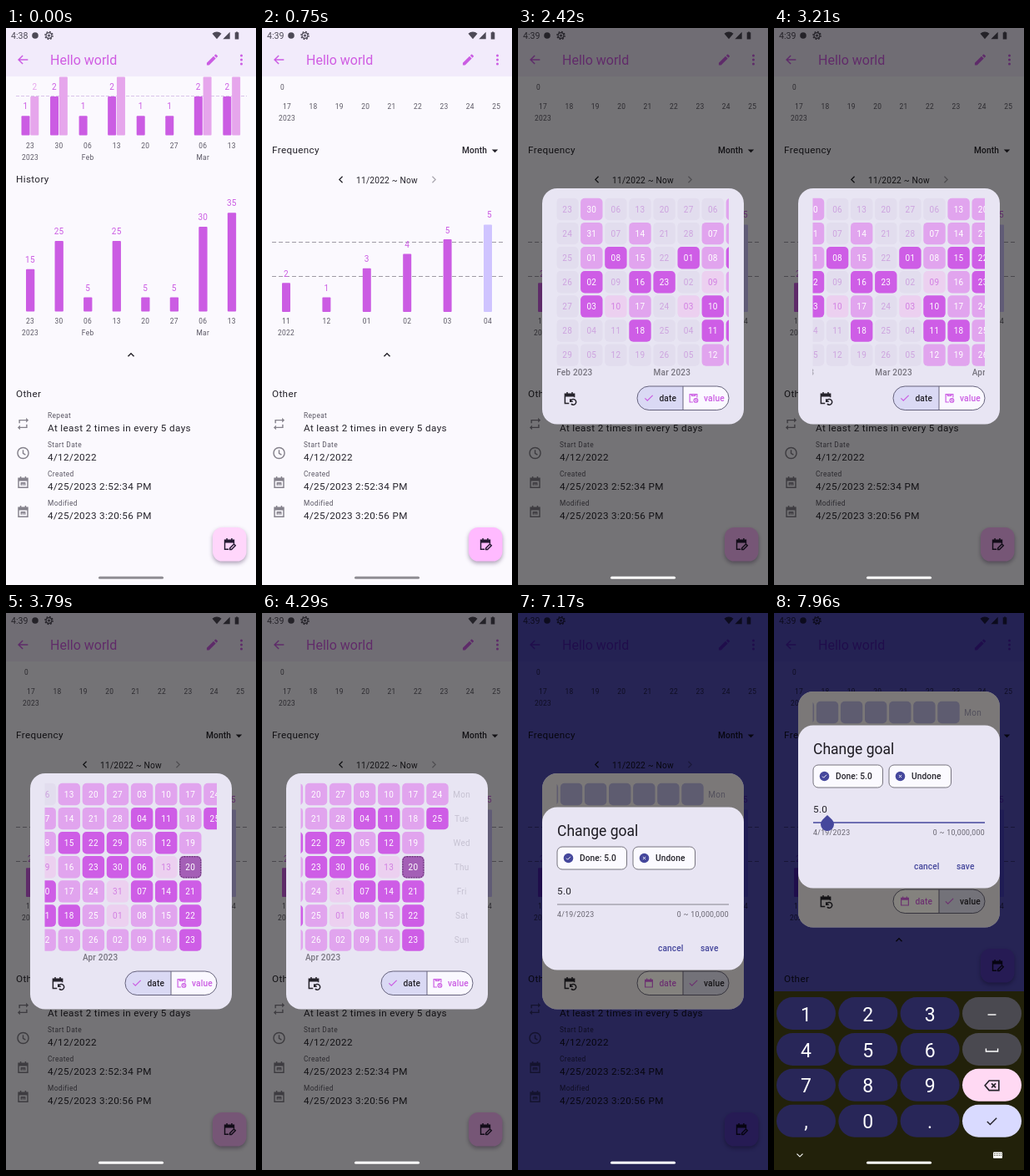
These frames come from a looping animation (300x667 px, 8000 ms). An HTML page with a canvas:

```html
<!DOCTYPE html>
<html lang="en">
<head>
<meta charset="utf-8">
<title>Habit tracker</title>
<style>
  html, body { margin: 0; width: 100%; height: 100%; overflow: hidden; background: #fbf9fe; }
  canvas { display: block; width: 300px; height: 667px; }
</style>
</head>
<body>
<canvas id="stage"></canvas>
<script>
const LOOP = 8000;
const CUT = 620, CALENDAR_IN = 960, VALUE_MODE = 4950, GOAL_IN = 6750, FOCUS = 7440;
const SCROLL = [[1230, 0], [1670, 141], [1840, 198], [2050, 228], [2600, 228], [3210, 187],
  [3600, 72], [3950, 15], [4290, 1], [4450, 0]];

const C = {
  accent: '#cb5ce3', soft: '#e6a6ec', ink: '#25232b', grey: '#5b5864', icon: '#85828c',
  page: '#fbf9fe', bar: '#f2ebfb', dialog: '#e8e5f3', navy: '#45479c'
};

const canvas = document.getElementById('stage');
const ctx = canvas.getContext('2d');
const ratio = window.devicePixelRatio || 1;
canvas.width = 300 * ratio;
canvas.height = 667 * ratio;

const clamp = v => Math.max(0, Math.min(1, v));
const fade = (t, start, length = 150) => clamp((t - start) / length);
const easeOut = v => 1 - (1 - v) ** 3;
const lerp = (a, b, v) => a + (b - a) * v;
const mix = (a, b, v) => `rgb(${a.map((n, i) => Math.round(lerp(n, b[i], v)))})`;

function track(keys, t) {
  if (t <= keys[0][0]) return keys[0][1];
  for (let i = 1; i < keys.length; i++) {
    const [t0, a] = keys[i - 1], [t1, b] = keys[i];
    if (t < t1) return lerp(a, b, (t - t0) / (t1 - t0));
  }
  return keys[keys.length - 1][1];
}

function rect(x, y, w, h, fill, r = 0, stroke) {
  ctx.beginPath();
  ctx.roundRect(x, y, w, h, r);
  if (fill) { ctx.fillStyle = fill; ctx.fill(); }
  if (stroke) { ctx.strokeStyle = stroke; ctx.lineWidth = 1; ctx.stroke(); }
}

// y is the middle of the capitals
function text(s, x, y, size, color, { align = 'left', weight = 400, gap = 0.3 } = {}) {
  ctx.font = `${weight} ${size}px Roboto, sans-serif`;
  ctx.letterSpacing = gap + 'px';
  ctx.textAlign = align;
  ctx.fillStyle = color;
  ctx.fillText(s, x, y + size * 0.355);
}
const centered = (s, x, y, size, color, o) => text(s, x, y, size, color, { align: 'center', ...o });

function line(x1, y1, x2, y2, color, width = 1, dash = []) {
  ctx.strokeStyle = color;
  ctx.lineWidth = width;
  ctx.setLineDash(dash);
  ctx.beginPath();
  ctx.moveTo(x1, y1);
  ctx.lineTo(x2, y2);
  ctx.stroke();
  ctx.setLineDash([]);
}

function disc(x, y, r, color) {
  ctx.fillStyle = color;
  ctx.beginPath();
  ctx.arc(x, y, r, 0, 7);
  ctx.fill();
}

const CALENDAR = 'M4.5 5.5h15v15h-15zM4.5 9h15M4.5 7.5h15M8 2.5v3M16 2.5v3';
const CALENDAR_OPEN = 'M11 20.5H4.5v-15h15V11M4.5 9h15M4.5 7.5h15M8 2.5v3M16 2.5v3';
// outlines on a 24 unit grid
const STROKES = {
  back: 'M20 12H5M11.5 5l-7 7 7 7',
  up: 'M7 14.5l5-5 5 5', down: 'M6 9.5l6 6 6-6', left: 'M14.5 6l-6 6 6 6', right: 'M9.5 6l6 6-6 6',
  check: 'M4 12.5l5 5L20 6.5', cross: 'M7 7l10 10M17 7L7 17',
  clock: 'M21 12a9 9 0 1 1-18 0a9 9 0 1 1 18 0M12 7v5.5l4 2.5',
  calendar: CALENDAR,
  event: CALENDAR + 'M9 17v-4h6v4M12 13v4',
  edit: CALENDAR_OPEN + 'M13 21v-2.5l6.5-6.5 2.5 2.5-6.5 6.5z',
  undo: CALENDAR_OPEN + 'M13 13.5v4h4M13.5 17a4.5 4.5 0 1 1 1 4.5',
  clipboard: 'M11 20.5H4.5v-16h15V11M8.5 4.5v3h7v-3M21 17a4 4 0 1 1-8 0a4 4 0 1 1 8 0M17 15v2.5l1.5 1',
  erase: 'M8 5h14v14H8l-6-7zM11.5 9l6 6M17.5 9l-6 6',
  space: 'M2 10v5h20v-5', minus: 'M5 12h14'
};
const FILLS = {
  pencil: 'M3 17.2V21h3.8L17.8 9.9l-3.7-3.7zM20.7 7c.4-.4.4-1 0-1.4l-2.3-2.3c-.4-.4-1-.4-1.4 0l-1.8 1.8 3.7 3.7z',
  repeat: 'M7 7h10v3l4-4-4-4v3H5v6h2zM17 17H7v-3l-4 4 4 4v-3h12v-6h-2z',
  wifi: 'M12 21L0 7a18 18 0 0 1 24 0z',
  signal: 'M2 22h20V2z',
  battery: 'M7 4h3V2h4v2h3v18H7z',
  drop: 'M6 9.5l6 6 6-6z'
};

function icon(name, x, y, color, size = 17.5, width = 2) {
  const solid = FILLS[name];
  const path = new Path2D(solid || STROKES[name]);
  ctx.save();
  ctx.translate(x - size / 2, y - size / 2);
  ctx.scale(size / 24, size / 24);
  ctx.fillStyle = ctx.strokeStyle = color;
  ctx.lineWidth = width;
  solid ? ctx.fill(path) : ctx.stroke(path);
  ctx.restore();
}

function multiply(color, x, y, w, h, r) {
  ctx.globalCompositeOperation = 'multiply';
  rect(x, y, w, h, color, r);
  ctx.globalCompositeOperation = 'source-over';
}

const barX = i => 29 + 34.55 * i;

function weekAxis(y) {
  const days = ['23', '30', '06', '13', '20', '27', '06', '13'];
  const below = { 0: '2023', 2: 'Feb', 6: 'Mar' };
  days.forEach((d, i) => {
    centered(d, barX(i), y, 8.4, C.grey);
    if (below[i]) centered(below[i], barX(i), y + 14, 8.4, C.grey);
  });
}

function weeklyCharts() {
  line(12, 81.5, 289, 81.5, '#d9c3ea', 1, [4, 2]);
  const goals = [2, 3, 0, 3, 0, 0, 3, 3];
  [1, 2, 1, 2, 1, 1, 2, 2].forEach((n, i) => {
    const x = barX(i), h = 23.3 * n, g = 23.3 * goals[i];
    rect(x - 10.5, 128.5 - h, 10, h, C.accent, 1);
    if (g) rect(x + 0.3, 128.5 - g, 10, g, C.soft, 1);
    centered(n, x - 5.5, 117 - h, 10, C.accent);
    if (goals[i] === 2) centered(2, x + 5.5, 70.5, 10, C.soft);
  });
  weekAxis(141);
  text('History', 12, 181, 11.7, C.ink, { gap: 0.36 });
  [15, 25, 5, 25, 5, 5, 30, 35].forEach((n, i) => {
    const h = n * 3.38;
    rect(barX(i) - 5, 339.5 - h, 10.3, h, C.accent, 1);
    centered(n, barX(i), 328 - h, 10, C.accent);
  });
  weekAxis(351);
}

function monthlyCharts() {
  centered('0', 24.5, 71, 8.4, C.grey);
  for (let i = 0; i < 9; i++) centered(17 + i, 30 + 31.4 * i, 94, 8.4, C.grey);
  centered('2023', 30, 108, 8.4, C.grey);
  text('Frequency', 12, 146, 11.7, C.ink, { gap: 0.36 });
  text('Month', 240, 146, 10.2, C.ink, { gap: 0.1, weight: 500 });
  icon('drop', 279.5, 147, C.ink, 15);
  icon('left', 95, 181.5, C.ink, 15);
  centered('11/2022 ~ Now', 150, 182, 10.2, C.ink, { gap: 0.2 });
  icon('right', 206, 181.5, '#aaa7b0', 15);
  for (const y of [256.5, 297.5]) line(12, y, 289, y, '#9f9ba5', 1, [5, 3]);
  const months = ['11', '12', '01', '02', '03', '04'];
  [2, 1, 3, 4, 5, 6].forEach((n, i) => {
    const x = 29 + 48.4 * i, h = 17.4 * n;
    rect(x - 5, 340 - h, 10, h, i < 5 ? C.accent : '#cfc4ff', 1);
    centered(i < 5 ? n : 5, x + (i < 5 ? 0 : 2), i < 5 ? 329 - h : 223, 10, C.accent);
    centered(months[i], x, 351, 8.4, C.grey);
  });
  centered('2022', 29, 365, 8.4, C.grey);
}

function appBar(time) {
  rect(0, 0, 300, 58, C.bar);
  text(time, 6, 9.5, 10.6, '#4d4956', { gap: 0 });
  disc(35, 9, 3.8, '#4d4956');
  ctx.strokeStyle = '#4d4956';
  for (const [r, w, dash] of [[4.6, 1.4, [1.8, 1.8]], [3.4, 1.2, []], [1, 1.2, []]]) {
    ctx.lineWidth = w;
    ctx.setLineDash(dash);
    ctx.beginPath();
    ctx.arc(51.5, 9, r, 0, 7);
    ctx.stroke();
  }
  ctx.setLineDash([]);
  icon('wifi', 253, 9, '#4d4956', 11);
  icon('signal', 264.5, 9, '#4d4956', 10);
  icon('battery', 277, 9, '#4d4956', 11);
  icon('back', 20.5, 38, C.accent);
  text('Hello world', 53, 38, 16, '#d05ce2', { gap: 0 });
  icon('pencil', 247.5, 38, C.accent);
  for (const y of [33, 38, 43]) disc(282.5, y, 1.5, C.accent);
}

function details() {
  icon('up', 150, 391.5, C.ink, 17);
  text('Other', 12, 438, 11.7, C.ink, { gap: 0.36 });
  const rows = [
    ['repeat', 'Repeat', 'At least 2 times in every 5 days'],
    ['clock', 'Start Date', '4/12/2022'],
    ['event', 'Created', '4/25/2023 2:52:34 PM'],
    ['event', 'Modified', '4/25/2023 3:20:56 PM']
  ];
  rows.forEach(([symbol, label, value], i) => {
    const y = 464.5 + 35 * i;
    icon(symbol, 20.5, y + 9.5, C.icon);
    text(label, 50, y, 8.4, C.grey, { gap: 0.36 });
    text(value, 50, y + 14.5, 11.7, C.ink, { gap: 0.36 });
  });
}

function editButton(y, fill) {
  ctx.save();
  ctx.shadowColor = 'rgba(60,30,80,.4)';
  ctx.shadowBlur = 5 * ratio;
  ctx.shadowOffsetY = 2.5 * ratio;
  rect(248, y - 20, 40.5, 40.5, fill, 11.5);
  ctx.restore();
  icon('edit', 268, y, '#251a33');
}

// one letter per day from Monday: Past, Faint, Light, Done, Today, - skipped
const WEEKS = ['LD', 'LLLTDDD', 'LDDFDLL', 'LDLDDLL', 'LLDDFFL', 'LLDD--L', 'LLDLLDL',
  'PLLFDDL', 'PPDPFPP', 'PPPDPPP', 'PLLDLDP', 'PPDPFPP', 'LLLDDPP'];
const CELL = {
  P: ['#e2ddee', '#cda3df', ''], F: ['#ecd0f0', '#d27fe2', '0'], L: ['#e1a4ee', '#fff', ''],
  D: ['#ce5de6', '#fff', '5'], T: ['#a45fb6', '#fff', '99'], '-': ['#e1a4ee', '#c964dd', '—']
};

function calendarGrid(scroll, showValues, dimmed) {
  ctx.save();
  ctx.beginPath();
  ctx.rect(46.5, 200, 206.5, 222);
  ctx.clip();
  for (let week = 0; week < 18; week++) {
    const x = 209.5 - 29.1 * week + scroll;
    if (x < 30 || x > 270) continue;
    [...(WEEKS[week] || 'PPPPPPP')].forEach((kind, day) => {
      const y = 217 + 29.1 * day;
      const [fill, ink, value] = CELL[kind];
      rect(x - 13.2, y - 13.2, 26.4, 26.4, dimmed && kind === 'L' ? '#b2aee2' : fill, 5);
      if (kind === 'T') {
        ctx.setLineDash([1.5, 1.5]);
        rect(x - 12.5, y - 12.5, 25, 25, null, 5, '#54295f');
        ctx.setLineDash([]);
      }
      const date = String(new Date(2023, 3, 24 - 7 * week + day).getDate()).padStart(2, '0');
      if (showValues) centered(value, x, y, 10, ink, { weight: kind === 'D' ? 500 : 400 });
      else centered(date, x, y, 10, kind === '-' ? '#fff' : ink);
    });
  }
  ['Mon', 'Tue', 'Wed', 'Thu', 'Fri', 'Sat', 'Sun'].forEach((d, i) =>
    centered(d, 238.7 + scroll, 217 + 29.1 * i, 10, dimmed ? '#9a96b8' : '#c6c2d2'));
  [['Apr', 5], ['Mar', 9], ['Feb', 13]].forEach(([m, week]) =>
    text(m + ' 2023', 196.5 - 29.1 * week + scroll, 412, 10, '#77747f', { weight: 500, gap: 0.2 }));
  ctx.restore();
}

function modeSwitch(showValues) {
  const on = '#dad9f4', off = '#faf8ff', edge = '#66637c';
  rect(143, 429, 55, 28.5, showValues ? off : on, [14, 0, 0, 14]);
  rect(198, 429, 55, 28.5, showValues ? on : off, [0, 14, 14, 0]);
  rect(143, 429, 110, 28.5, null, 14.2, edge);
  line(198, 429, 198, 457.5, edge);
  icon(showValues ? 'calendar' : 'check', 157, 443, C.accent, 14);
  icon(showValues ? 'check' : 'clipboard', 210.5, 443, C.accent, 14);
  const label = { weight: 500, gap: 0.1 };
  text('date', 169.5, 443, 10.2, showValues ? C.accent : C.ink, label);
  text('value', 223, 443, 10.2, showValues ? C.ink : C.accent, label);
}

function calendarDialog(t, dim) {
  const showValues = t >= VALUE_MODE;
  rect(29, 192, 242, 282.5, C.dialog, 18);
  calendarGrid(track(SCROLL, t), showValues, dim > 0.5);
  icon('undo', 62, 443, C.ink, 18);
  modeSwitch(showValues);
  if (dim) multiply(mix([255, 255, 255], [135, 134, 126], dim), 29, 192, 242, 282.5, 18);
}

function chip(x, w, symbol, label) {
  rect(x, 280, w, 27, '#fbfaff', 6, '#77747f');
  disc(x + 13.5, 293.5, 5.8, C.navy);
  icon(symbol, x + 13.5, 293.5, '#fff', 7.5, 3);
  text(label, x + 27, 293.5, 10.2, C.ink, { weight: 500, gap: 0.07 });
}

function goalDialog(focused) {
  rect(29, 232.5, 242, 195, C.dialog, 18);
  text('Change goal', 47, 261, 17.5, '#1d1b22', { gap: 0 });
  chip(47, 83.5, 'check', 'Done: 5.0');
  chip(138, 74.5, 'cross', 'Undone');
  text('5.0', 47, 332.5, 11.7, C.ink, { gap: 0.36 });
  text('4/19/2023', 47, 361, 8.75, '#66636e');
  text('0 ~ 10,000,000', 253, 361, 8.75, '#66636e', { align: 'right' });
  line(47, 349, 253, 349, focused ? C.navy : '#85838d', focused ? 1.6 : 1);
  if (focused) {
    ctx.fillStyle = C.navy;
    ctx.fill(new Path2D('M64 340l5.7 5.4a8 8 0 1 1-11.4 0z'));
  }
  text('cancel', 168, 401.5, 10.2, C.navy, { weight: 500, gap: 0.07 });
  text('save', 219, 401.5, 10.2, C.navy, { weight: 500, gap: 0.07 });
}

function keyboard() {
  rect(0, 453, 300, 214, '#22210a');
  const keys = ['123', '456', '789', ',0.'];
  const side = [['minus', '#4a4950', '#fff'], ['space', '#4a4950', '#fff'],
    ['erase', '#ffd9f3', C.ink], ['check', '#d9daff', C.ink]];
  keys.forEach((row, r) => {
    const y = 460 + 42.9 * r;
    [...row].forEach((k, c) => {
      rect(3 + 74.3 * c, y, 71, 39, '#282658', 19.5);
      centered(k, 38.5 + 74.3 * c, y + 20.5, 23, '#fff', { gap: 0 });
    });
    const [symbol, fill, ink] = side[r];
    rect(226, y, 71, 39, fill, 19.5);
    icon(symbol, 261.5, y + (symbol === 'minus' ? 21 : 20), ink, r === 2 ? 20 : 17);
  });
  icon('down', 31, 649, '#fff', 14);
  rect(263, 645.5, 11, 7.5, '#fff', 1);
  for (const y of [647.5, 649.5]) line(264, y, 273, y, '#22210a', 0.8, [1, 1]);
}

function draw(t) {
  const first = t < CUT;
  const shade = fade(t, CALENDAR_IN), dim = fade(t, GOAL_IN);
  const lift = easeOut(fade(t, FOCUS + 60, 280));

  ctx.setTransform(ratio, 0, 0, ratio, 0, 0);
  ctx.globalAlpha = 1;
  rect(0, 0, 300, 667, C.page);
  first ? weeklyCharts() : monthlyCharts();
  appBar(first ? '4:38' : '4:39');
  details();
  editButton(618 - 196 * lift, first ? '#ffd6fb' : '#ffbaff');

  if (shade) {
    const color = dim ? mix([118, 118, 118], [38, 36, 84], dim) : mix([255, 255, 255], [118, 118, 118], shade);
    multiply(color, 0, 0, 300, 667);
    ctx.save();
    ctx.translate(0, -98 * lift);
    ctx.globalAlpha = shade;
    calendarDialog(t, dim);
    ctx.globalAlpha = dim;
    if (dim) goalDialog(t >= FOCUS);
    ctx.restore();
  }
  if (lift) {
    ctx.save();
    ctx.translate(0, 214 * (1 - lift));
    keyboard();
    ctx.restore();
  }
  rect(111, 656.7, 78, 3, mix([143, 141, 147], [255, 255, 255], shade), 1.5);
}

const start = performance.now();
function frame() {
  draw((performance.now() - start) % LOOP);
  requestAnimationFrame(frame);
}
frame();
</script>
</body>
</html>
```
